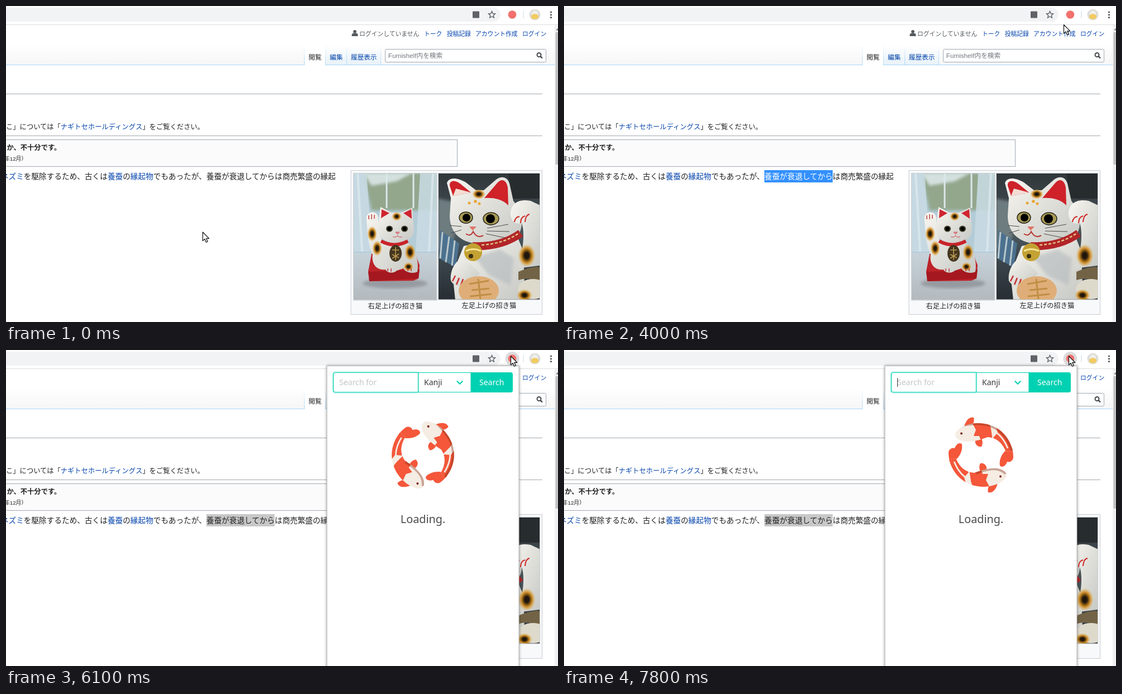
These frames come from a looping animation (989 by 566 pixels, 8 s). An HTML page:

```html
<!DOCTYPE html>
<html lang="ja">
<head>
<meta charset="utf-8">
<title>Kanji lookup</title>
<style>
html, body { margin: 0; width: 100%; height: 100%; overflow: hidden; background: #fff; }
svg { display: block; }
text { font-family: "Liberation Sans", "Noto Sans CJK JP", "Noto Sans CJK", sans-serif; fill: #202122; white-space: pre; }
.link { fill: #0645ad; }
.ui text { font-family: "Noto Sans", "Open Sans", sans-serif; }
</style>
</head>
<body>
<svg width="989" height="566" viewBox="0 0 989 566">
  <defs>
    <linearGradient id="head" x2="0" y2="1"><stop offset=".45" stop-color="#fff"/><stop offset="1" stop-color="#f6f6f6"/></linearGradient>
    <linearGradient id="tab" x2="0" y2="1"><stop stop-color="#fff"/><stop offset="1" stop-color="#e8f2f8"/></linearGradient>
    <linearGradient id="edge" x2="0" y2="1"><stop stop-color="#a7d7f9" stop-opacity="0"/><stop offset="1" stop-color="#a7d7f9"/></linearGradient>
    <linearGradient id="sill" x2="0" y2="1"><stop stop-color="#c6d2da"/><stop offset="1" stop-color="#b3b9bd"/></linearGradient>
    <linearGradient id="room" x2="0" y2="1"><stop stop-color="#30373b"/><stop offset=".5" stop-color="#48555a"/><stop offset="1" stop-color="#262d33"/></linearGradient>
    <linearGradient id="fur" x2="1" y2="1"><stop stop-color="#f8f6f0"/><stop offset="1" stop-color="#c6c8c4"/></linearGradient>
    <radialGradient id="spot"><stop offset=".25" stop-color="#20160b"/><stop offset=".6" stop-color="#c8861f"/><stop offset="1" stop-color="#e8b860" stop-opacity="0"/></radialGradient>
    <clipPath id="p1"><rect x="623" y="300" width="148.500" height="226.500"/></clipPath>
    <clipPath id="p2"><rect x="775" y="300" width="181" height="225.500"/></clipPath>
    <clipPath id="skin"><path d="M-46-36C-46-44-30-56-6-57C28-57 50-36 57-8L45-6C38-22 28-31 12-32C-4-26-16-23-28-24C-38-25-46-30-46-36Z"/></clipPath>
    <filter id="soft" x="-10%" y="-10%" width="120%" height="120%"><feGaussianBlur stdDeviation="2.500"/></filter>
  </defs>

  <rect width="989" height="566" fill="#fff"/>
  <!-- article header -->
  <rect y="34" width="983" height="72" fill="url(#head)"/>
  <rect y="105" width="983" height="1" fill="#a7d7f9"/>
  <rect x="535" y="70" width="37" height="36" fill="#fff"/>
  <rect x="573" y="70" width="98" height="35" fill="url(#tab)"/>
  <g id="edges"></g>
  <circle cx="625" cy="45.800" r="2.900" fill="#54595d"/>
  <path d="M619.500 54V52C619.500 49 622 48.500 625 48.500S630.500 49 630.500 52V54Z" fill="#54595d"/>
  <rect id="box" x="679.500" y="77.500" width="288" height="23" rx="2" fill="#fff" stroke="#a2a9b1"/>
  <circle cx="955" cy="87.500" r="3.500" fill="none" stroke="#404244" stroke-width="1.900"/>
  <path d="M957.600 90.200L961 93.500" stroke="#404244" stroke-width="2.300"/>

  <!-- article body -->
  <path d="M0 157.500H961M0 232.500H961" stroke="#a2a9b1"/>
  <rect x="-5" y="239.500" width="813.500" height="48" fill="#fbfbfb" stroke="#a2a9b1"/>
  <rect x="618" y="294.500" width="342.500" height="258" fill="#f8f9fa" stroke="#c8ccd1"/>
  <rect id="mark" x="359" y="294" height="22"/>
  <g id="words"></g>
  <text id="para" y="310" font-size="13.650"></text>

  <!-- left picture -->
  <rect x="622.500" y="299.500" width="149.500" height="227.500" fill="#fff" stroke="#c8ccd1"/>
  <g clip-path="url(#p1)">
    <rect x="622" y="299" width="150" height="150" fill="#b3ccd8"/>
    <path d="M640 299H772V366H655Z" fill="#93a78d" filter="url(#soft)"/>
    <path d="M640 299H728L700 314 655 322Z" fill="#d3e0de" filter="url(#soft)"/>
    <path d="M623 299H646L656 440H623ZM742 299H772V440H734Z" fill="#c9dce4" opacity=".85"/>
    <path d="M630 299L638 440M765 299L758 440" stroke="#dfebef" stroke-width="4" opacity=".7"/>
    <path d="M682 299V362M730 299V362" stroke="#dbe7ea" stroke-width="3"/>
    <rect x="622" y="442" width="150" height="86" fill="url(#sill)"/>
    <ellipse cx="697" cy="497" rx="58" ry="9" fill="#969ba1" filter="url(#soft)"/>
    <path d="M655 444H733L741 464 739 488 730 492 651 493 649 475Z" fill="#bd2329"/>
    <path d="M649 476L741 472 739 488 651 493Z" fill="#a5181f"/>
    <path d="M646 384C643 366 666 364 667 380L668 405 676 425C690 416 710 416 722 426 736 440 740 462 737 476 730 480 716 478 712 470L700 474C694 480 682 478 680 472 664 474 654 462 657 444 649 430 648 410 646 384Z" fill="url(#fur)"/>
    <path d="M667 390L671 360 690 370H708L728 361 730 390C736 416 718 424 698 424 676 424 664 412 667 390Z" fill="url(#fur)"/>
    <path d="M672 380L673 364 687 371ZM712 371L726 364 727 381Z" fill="#cf2530"/>
    <ellipse cx="700" cy="377" rx="9" ry="8" fill="url(#spot)"/>
    <ellipse cx="656" cy="408" rx="9" ry="14" fill="url(#spot)"/>
    <ellipse cx="665" cy="434" rx="9" ry="14" fill="url(#spot)"/>
    <ellipse cx="724" cy="441" rx="10" ry="15" fill="url(#spot)"/>
    <ellipse cx="721" cy="467" rx="9" ry="8" fill="url(#spot)"/>
    <path d="M650 382V375M655 382V373M660 381V374M684 475V470M690 476V470M720 475V470M726 475V470" stroke="#b6262b" stroke-width="1.300"/>
    <ellipse cx="687" cy="399" rx="6" ry="5.500" fill="#3c3a24"/><ellipse cx="714" cy="399" rx="6" ry="5.500" fill="#3c3a24"/>
    <circle cx="687" cy="399" r="3.600"/><circle cx="714" cy="399" r="3.600"/>
    <path d="M698 405H705L701.500 409ZM693 413Q698 416 701.500 411 705 416 710 413" fill="#e58a92" stroke="#c4484f" stroke-width=".8"/>
    <path d="M672 421Q696 434 720 421" fill="none" stroke="#c8232a" stroke-width="6"/>
    <ellipse cx="698" cy="443" rx="11" ry="15" fill="#45361f"/>
    <path d="M692 437H704M698 432V455M692 445L704 451M704 444L692 452" stroke="#b99a52" stroke-width="1.600"/>
  </g>

  <!-- right picture -->
  <rect x="774.500" y="299.500" width="182" height="226.500" fill="#fff" stroke="#c8ccd1"/>
  <g clip-path="url(#p2)">
    <rect x="774" y="299" width="183" height="228" fill="url(#room)"/>
    <path d="M774 345L800 350 806 400 796 440 774 436Z" fill="#6d7b7f" filter="url(#soft)"/>
    <path d="M778 402L812 425 806 468 776 452Z" fill="#4c718f"/>
    <path d="M782 405L778 452M794 413L788 459M804 420L799 465" stroke="#b9c8cb" stroke-width="3"/>
    <path d="M900 299H957V345H905Z" fill="#272c2f"/>
    <path d="M820 430L915 410 927 440 930 527H805L800 480Z" fill="url(#fur)"/>
    <path d="M840 450L885 436 910 452 904 500 865 482Z" fill="#b3babd" opacity=".6" filter="url(#soft)"/>
    <path d="M797 344L790 317C793 307 807 306 824 316L842 330H856L878 311C890 302 901 308 903 322L909 349C923 366 928 389 921 404 909 425 868 431 838 425 812 421 795 403 795 376Z" fill="url(#fur)"/>
    <path d="M801 340L795 322C794 311 806 311 816 320L833 334ZM857 344L881 316C890 307 898 315 899 326L900 357C888 345 872 343 857 344Z" fill="#cf2229"/>
    <path d="M801 340L806 327 833 334Z" fill="#f4ddd4"/>
    <ellipse cx="847" cy="337" rx="12" ry="9" fill="url(#spot)"/>
    <g fill="#e9a735"><circle cx="830" cy="353" r="2.500"/><circle cx="841" cy="350" r="2.800"/><circle cx="848" cy="354" r="2.500"/></g>
    <g stroke="#26231a" stroke-width="1.500"><ellipse cx="824" cy="379" rx="12" ry="10" fill="#a89b54"/><ellipse cx="869" cy="381" rx="14" ry="11" fill="#a89b54"/></g>
    <circle cx="825" cy="379" r="7"/><circle cx="868" cy="381" r="8"/>
    <path d="M830 395H843L836 402Z" fill="#df7467"/>
    <path d="M824 408Q832 414 837 404 844 417 855 411" fill="none" stroke="#b83a37" stroke-width="2"/>
    <path d="M816 395L795 393M816 401L797 407M862 398L900 391M862 403L902 404M860 408L898 416" stroke="#4c4a46"/>
    <path d="M836 430Q888 432 922 407" fill="none" stroke="#b22528" stroke-width="14"/>
    <path d="M852 428Q892 426 920 406" fill="none" stroke="#e1c282" stroke-width="2.500" stroke-dasharray="5 3"/>
    <circle cx="837" cy="441" r="16" fill="#c3a132"/><path d="M824 439Q837 432 851 439" fill="none" stroke="#f5e594" stroke-width="3"/>
    <circle cx="833" cy="448" r="4" fill="#3d3114"/>
    <path d="M904 375C903 353 919 345 940 349L957 357V465L916 470C927 440 930 405 924 389 913 392 906 386 904 375Z" fill="url(#fur)"/>
    <path d="M911 387Q912 378 920 377M922 389Q922 378 930 376M930 387Q931 374 938 373" fill="none" stroke="#cd2d2b" stroke-width="2"/>
    <ellipse cx="933" cy="447" rx="16" ry="21" fill="url(#spot)"/>
    <path d="M918 476Q944 465 957 468V493Q932 485 918 491Z" fill="#736346"/>
    <ellipse cx="944" cy="507" rx="27" ry="18" fill="#dedacb"/>
    <ellipse cx="929" cy="518" rx="14" ry="11" fill="url(#spot)"/>
    <path d="M820 450C804 456 795 475 797 492 804 504 817 506 825 495L850 480Z" fill="url(#fur)"/>
    <path d="M800 493L805 483M807 499L812 487M815 500L819 489" stroke="#c52f30" stroke-width="2.500"/>
    <ellipse cx="847" cy="510" rx="36" ry="26" fill="#dfae78"/>
    <path d="M830 498L865 492M846 489L850 525M834 509L866 506M831 520L870 516" stroke="#c08e45" stroke-width="3"/>
  </g>

  <!-- scrollbar -->
  <rect x="983" y="34" width="6" height="532" fill="#f1f1f1"/>
  <rect x="984.500" y="47" width="4.500" height="237" fill="#c1c1c1"/>
  <path d="M985 43.500L989 39.500V43.500Z" fill="#7d7d7d"/>

  <!-- browser toolbar -->
  <rect width="989" height="33" fill="#fff"/>
  <rect y="33" width="989" height="1" fill="#dcdde0"/>
  <rect x="-20" y="3" width="906" height="25" rx="12.500" fill="#f1f3f4"/>
  <rect x="836" y="9.500" width="12" height="12" rx="1" fill="#5f6368"/>
  <path d="M870.500 9.500L872.300 13.500 876.500 13.900 873.300 16.700 874.300 21 870.500 18.700 866.700 21 867.700 16.700 864.500 13.900 868.700 13.500Z" fill="none" stroke="#5f6368" stroke-width="1.400"/>
  <circle id="halo" cx="907" cy="15.500" r="12.500" fill="#dcdcdc"/>
  <circle cx="907" cy="15.500" r="7.300" fill="#f2706d"/>
  <rect x="926.500" y="9" width="1" height="13" fill="#c6d9e6"/>
  <circle cx="947.500" cy="15.500" r="10" fill="#dcdcda"/>
  <circle cx="947.500" cy="14" r="6" fill="#eeeeea"/>
  <path d="M941 21.500V17Q947.500 11 954 17V21.500Q947.500 26 941 21.500Z" fill="#f2cb62"/>
  <g fill="#4d5156"><circle cx="976.500" cy="11" r="1.600"/><circle cx="976.500" cy="15.800" r="1.600"/><circle cx="976.500" cy="20.600" r="1.600"/></g>

  <g id="tip" class="ui">
    <rect x="851" y="42" width="140" height="23" rx="2" fill="#2b2b2b"/>
    <text x="859" y="57.500" font-size="11.500" style="fill:#fff">Search selected kanji</text>
  </g>

  <!-- extension popup -->
  <g id="popup" class="ui">
    <rect x="574.500" y="28" width="345" height="560" fill="#000" opacity=".4" filter="url(#soft)"/>
    <rect x="575" y="28.500" width="344" height="560" fill="#fff" stroke="#b9b9b9"/>
    <rect x="585.500" y="39" width="154" height="38" rx="4" fill="none" stroke="#00d1b2" stroke-opacity=".25" stroke-width="2"/>
    <path d="M738.500 40.500H590.500Q586.500 40.500 586.500 44.500V71.500Q586.500 75.500 590.500 75.500H738.500ZH833V75.500H738.500" fill="none" stroke="#00d1b2" stroke-width="1.200"/>
    <path d="M833 40H904Q908 40 908 44V72Q908 76 904 76H833Z" fill="#00d1b2"/>
    <text x="597" y="63" font-size="14" style="fill:#c6c6c6">Search for</text>
    <rect id="caret" x="597" y="50" width="1" height="16" fill="#363636"/>
    <text x="749" y="63" font-size="14" style="fill:#363636">Kanji</text>
    <path d="M807.800 55.500L813 60.700 818.200 55.500" fill="none" stroke="#00d1b2" stroke-width="2.200"/>
    <text x="848" y="63" font-size="14" style="fill:#fff">Search</text>
    <g id="koi"></g>
    <text id="load" x="747" y="310" font-size="19.800" text-anchor="middle" style="fill:#4a4a4a"></text>
  </g>

  <path id="arrow" d="M0 0V15.600L3.600 12.400 6.100 18.200 8.800 17 6.300 11.400H11.200Z" fill="#fff" stroke="#111" stroke-width="1.200" stroke-linejoin="round"/>
  <g id="beam" fill="none"><path d="M-3-7.500H-1.500L0-6.500 1.500-7.500H3M0-6.500V6.500M-3 7.500H-1.500L0 6.500 1.500 7.500H3" stroke="#fff" stroke-width="3"/><path d="M-3-7.500H-1.500L0-6.500 1.500-7.500H3M0-6.500V6.500M-3 7.500H-1.500L0 6.500 1.500 7.500H3" stroke="#111" stroke-width="1.500"/></g>
</svg>
<script>
const $ = id => document.getElementById(id);
const set = (id, name, value) => $(id).setAttribute(name, value);
const show = (id, on) => set(id, 'opacity', +on);

const word = (x, y, size, text, cls = '', style = '') =>
  `<text x="${x}" y="${y}" font-size="${size}" class="${cls}" style="${style}">${text}</text>`;
const link = text => `<tspan class="link">${text}</tspan>`;

$('edges').innerHTML = [534, 572, 610, 671]
  .map(x => `<rect x="${x}" y="70" width="1" height="36" fill="url(#edge)"/>`).join('');

$('words').innerHTML = [
  word(633, 54, 10.8, 'ログインしていません', '', 'fill:#54595d'),
  word(749, 54, 10.8, 'トーク', 'link'),
  word(789.7, 54, 10.8, '投稿記録', 'link'),
  word(841, 54, 10.8, 'アカウント作成', 'link'),
  word(925, 54, 10.8, 'ログイン', 'link'),
  word(542, 96, 11.7, '閲覧'),
  word(580, 96, 11.7, '編集', 'link'),
  word(617.7, 96, 11.7, '履歴表示', 'link'),
  word(684.8, 93, 11.7, 'Fumishelf内を検索', '', 'fill:#72777d'),
  word(0, 221, 12.3, `こ」については「${link('ナギトセホールディングス')}」をご覧ください。`),
  word(1.4, 258, 12.3, 'か、不十分です。', '', 'font-weight:bold'),
  word(-3.2, 277, 9.85, '年12月）'),
  word(648.6, 542, 12.2, '右足上げの招き猫'),
  word(816.6, 541, 12.2, '左足上げの招き猫')
].join('');

const picked = [...'養蚕が衰退してから'];
set('para', 'x', -9.1);
$('para').innerHTML = `${link('ネズミ')}を駆除するため、古くは${link('養蚕')}の${link('縁起物')}でもあったが、` +
  picked.map(c => `<tspan class="pick">${c}</tspan>`).join('') + 'は商売繁盛の縁起';
const chars = [...document.querySelectorAll('.pick')];

const fish = (turn, shade) => `<g transform="rotate(${turn})">
  <path d="M-30-51C-27-62-21-69-13-67C-11-61-14-55-18-50ZM-10-29C-12-19-6-14 1-15C4-20 3-27 0-31Z" fill="#f4573a"/>
  <path d="M52-14C40-7 32 6 34 19C38 24 45 19 47 12C52 14 58 10 58 4C58-2 57-8 56-12Z" fill="#f4573a"/>
  <g clip-path="url(#skin)">
    <rect x="-60" y="-70" width="130" height="80" fill="#f5ece3"/>
    <path d="M-17-60L14-60 18-47 21-26 0-26 -3-34 -13-34 -9-45ZM25-58L64-30 60 2 38-2 22-31 30-40Z" fill="#f4573a"/>
    <path d="M19-45C33-39 42-27 48-12" fill="none" stroke="#f5ece3" stroke-width="2.800"/>
    <path d="${shade}" fill="none" stroke="#7e2a14" stroke-opacity=".38" stroke-width="9"/>
  </g>
  <circle cx="-35" cy="-38.500" r="2" fill="#7d2218"/></g>`;
$('koi').innerHTML = fish(0, 'M-36-54C-26-58-16-58-6-58C29-58 51-36 58-6') +
  fish(180, 'M-46-32C-38-24-28-22-18-23S2-27 10-31');

// Piecewise linear value through [time, value] points
function track(t, points) {
  if (t <= points[0][0]) return points[0][1];
  for (let i = 1; i < points.length; i++) {
    const [a, from] = points[i - 1], [b, to] = points[i];
    if (t <= b) return from + (to - from) * (t - a) / (b - a);
  }
  return points[points.length - 1][1];
}
const ease = u => u * u * (3 - 2 * u);
const part = (t, a, b) => Math.min(1, Math.max(0, (t - a) / (b - a)));

function pointer(t) {
  if (t < 1100) {
    const u = ease(part(t, 100, 600));
    return [352.5 + 7 * u, 405 - 100 * u];
  }
  if (t < 3300) return [
    track(t, [[1100, 359.5], [1400, 388], [2000, 461], [2200, 474], [2400, 479.5]]),
    track(t, [[1100, 305], [2400, 308]])
  ];
  if (t <= 4000) {
    const u = ease(part(t, 3200, 4050)) / ease(part(4000, 3200, 4050));
    return [479.5 + 416 * u, 308 - 274.5 * u];
  }
  return [
    track(t, [[4000, 895.5], [4100, 902], [4400, 904.5]]),
    track(t, [[4000, 33.5], [4100, 22], [4400, 11]])
  ];
}

const stalls = [6200, 6800, 7400, 7900];

function draw(t) {
  const [x, y] = pointer(t);
  const inBox = x > 679 && x < 968 && y > 77 && y < 101;
  const beam = inBox || (x < 592 && y > 294 && y < 316);
  show('beam', beam);
  show('arrow', !beam);
  set('beam', 'transform', `translate(${x} ${y})`);
  set('arrow', 'transform', `translate(${x} ${y})`);
  set('box', 'stroke', inBox ? '#72777d' : '#a2a9b1');

  const count = t < 2400 ? Math.max(0, Math.round((x - 359) / 13.6)) : 9;
  const active = t < 5300;
  set('mark', 'width', count * 13.6);
  set('mark', 'fill', active ? '#3390ff' : '#c8c8c8');
  chars.forEach((c, i) => { c.style.fill = active && i < count ? '#fff' : '#202122'; });

  show('halo', t >= 4600);
  set('tip', 'opacity', track(t, [[4500, 0], [4600, .6], [4700, 1], [4800, .6], [4900, 0]]));

  set('popup', 'opacity', track(t, [[5200, 0], [5300, .55], [5500, 1]]));
  set('popup', 'transform', `translate(0 ${track(t, [[5300, -1.5], [5500, 0]])})`);
  show('caret', t < 5850 || Math.floor((t - 5350) / 500) % 2 === 0);
  $('load').textContent = 'Loading' + '.'.repeat(Math.max(0, Math.floor((t - 5200) / 500)) % 4);
  const moves = (t - 5300) / 100 - stalls.filter(s => t >= s).length;
  const turn = track(moves, [[0, -467], [8, -307], [16, -136], [22, 0]]);
  set('koi', 'transform', `translate(747 188) rotate(${turn})`);
}

function tick(now) {
  draw(Math.floor(now % 8000 / 100) * 100);
  requestAnimationFrame(tick);
}
draw(0);
requestAnimationFrame(tick);
</script>
</body>
</html>
```
